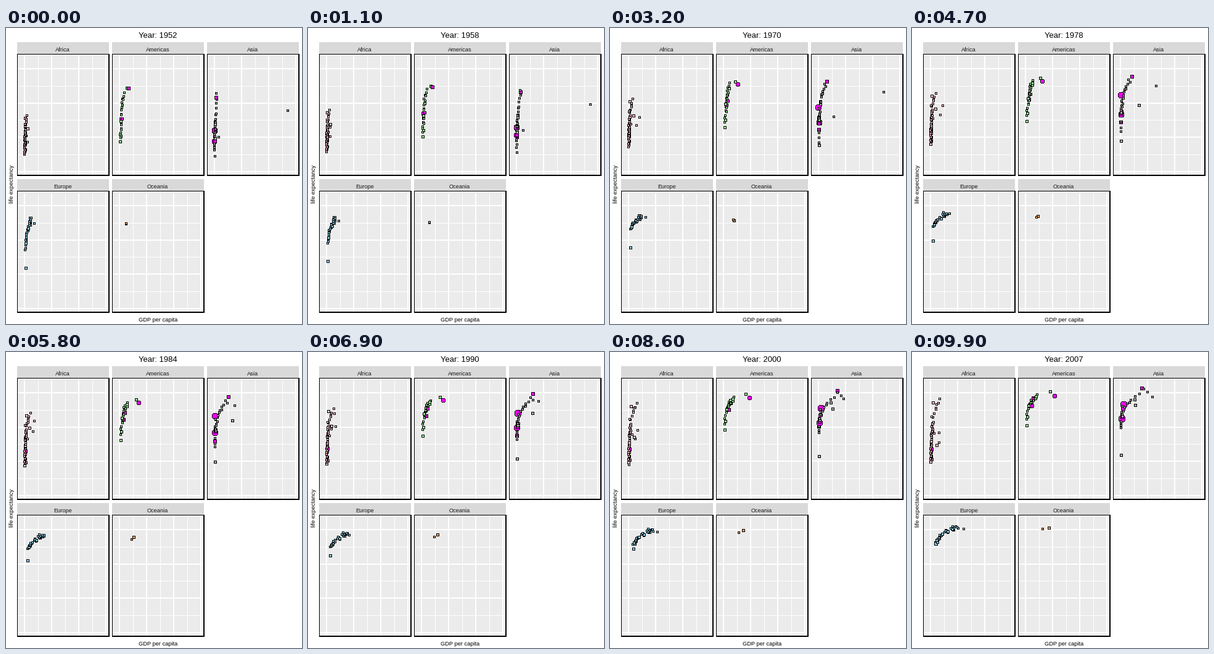
These frames come from a looping animation (480x480 px, 10 s). A matplotlib script:

```python
import numpy as np
import matplotlib.pyplot as plt
from matplotlib.animation import FuncAnimation
from matplotlib.patches import Rectangle

plt.rcParams["font.family"] = "Liberation Sans"

SIZE, FRAMES = 480, 100
FIRST, LAST = 1952, 2007
QUARTILES = np.linspace(0, 1, 5)
rng = np.random.default_rng(7)

fig = plt.figure(figsize=(SIZE / 72, SIZE / 72), dpi=72, facecolor="white")
ax = fig.add_axes([0, 0, 1, 1])
ax.set(xlim=(0, SIZE), ylim=(SIZE, 0))
ax.axis("off")


def box(x, y, w, h, color):
    ax.add_patch(Rectangle((x, y), w, h, fc=color, lw=0, antialiased=False))


def label(x, y, text, size, **kw):
    return ax.text(x, y, text, fontsize=size, ha="center", va="baseline", **kw)


def draw_panel(title, x, y):
    box(x, y, 149, 20, "#d9d9d9")
    label(x + 74, y + 15, title, 9.3, color="#1a1a1a")
    top = y + 19
    box(x, top, 150, 198, "black")
    box(x + 1, top + 1, 147, 195, "#ebebeb")
    for k in range(7):
        major = k % 2 == 0
        box(x + 1, top + 24 + round(27.8 * k) - major, 147, 1 + major, "white")
        box(x + 12 + 22 * k - major, top + 1, 1 + major, 195, "white")


def at(keys, year):
    """Value at a year, with keys spread evenly over the whole period."""
    return np.interp(year, np.linspace(FIRST, LAST, len(keys)), keys)


def cloud(n, life, gdp, noise):
    """n countries ranked poor to rich.

    life: quartiles per key year; gdp: low, middle, high per key year.
    """
    rank = (np.arange(n) + rng.random(n)) / n
    rank[0], rank[-1] = 0, 1
    countries = []
    for r in rank:
        luck = np.exp(noise * rng.normal())
        lives = [np.interp(r, QUARTILES, q) for q in life]
        gdps = [luck * np.exp(np.interp(r, QUARTILES[::2], np.log(g)))
                for g in gdp]
        people = min(np.exp(rng.normal(2.1, 0.9)), 85)
        countries.append((lives, gdps, (people / 2, people)))
    return countries


# Clouds of ordinary countries, then the few that stand out:
# (life expectancy keys, GDP keys, population keys in millions)
AFRICA = cloud(
    46,
    [(30, 35.2, 39, 42, 52.5), (34.5, 41.2, 45, 50, 62.5),
     (38.5, 46.5, 51, 57.5, 70), (39.6, 46, 52.5, 59, 76.4)],
    [(500, 950, 2200), (650, 1150, 4800), (650, 1400, 8000)], 0.4)
AFRICA_STARS = [
    ((36.3, 42.2, 47.1, 46.9), (1077, 2014), (33, 135)),
    ((42.7, 51.9, 67.1, 74), (2387, 9000, 21400, 14000, 9500, 12057), (1, 6)),
    ((37, 47.3, 60.5, 56.7), (4293, 7000, 15500, 13200, 14500, 13206), (1, 2)),
    ((47.6, 52, 57.5, 63.2, 54, 50.7), (851, 1900, 6700, 12570), (1, 2)),
    ((45, 53, 61.5, 49.3), (4725, 7500, 7700, 9270), (14, 44)),
    ((40, 43.3, 44.8, 45, 33.6, 46.2), (493, 863), (3, 9)),
]
AMERICAS = cloud(
    21,
    [(37.6, 43.5, 50.8, 58.8, 66.1), (46.1, 54.1, 61.1, 66.3, 71.8),
     (54.1, 64.2, 67.9, 72, 75.1), (60.9, 70.5, 72.7, 75.2, 78.8)],
    [(1900, 3000, 5500), (2400, 6200, 8500), (2000, 7000, 13500)], 0.28)
AMERICAS_STARS = [
    ((50.9, 58.9, 65.8, 72.4), (2109, 4460, 7500, 9066), (57, 190)),
    ((68.8, 72.6, 77.2, 80.7), (11367, 18000, 26550, 36319), (14, 33)),
    ((50.8, 61.6, 70.1, 76.2), (3478, 6450, 8950, 11978), (30, 109)),
    ((68.4, 71.1, 75.4, 78.2), (13990, 20900, 30600, 42952), (158, 301)),
]
ASIA = cloud(
    24,
    [(32.5, 39.4, 44.9, 50.8, 65.4), (37, 50.5, 55.5, 64, 71.3),
     (52, 60.3, 66, 70.2, 76.7), (59.5, 66.5, 71.5, 74.4, 82.2)],
    [(500, 1150, 3500), (650, 2900, 13000), (1000, 5200, 36000)], 0.3)
ASIA_STARS = [
    ((28.8, 35.4, 41.1, 43.8), (779, 975), (8, 32)),
    ((37.5, 44.6, 54, 64.1), (684, 1391), (47, 150)),
    ((44, 47.3, 63.5, 66.4, 70, 73), (400, 640, 1450, 4959), (556, 820, 1110, 1319)),
    ((37.4, 49, 59.1, 64.7), (547, 720, 1040, 2452), (372, 1110)),
    ((37.5, 48.1, 61, 70.7), (750, 980, 1960, 3541), (82, 223)),
    ((63, 72.7, 78.9, 82.6), (3217, 13100, 23900, 31656), (86, 127)),
    ((55.6, 66.6, 74.5, 77.6),
     (108382, 113523, 95458, 80895, 109348, 59265,
      31354, 28118, 34933, 40301, 35110, 47307), (1, 3)),
    ((43.4, 51.3, 59.1, 65.5), (685, 2606), (41, 169)),
    ((39.9, 52.2, 67.6, 72.8), (6460, 12600, 28600, 26200, 20900, 21655), (4, 27)),
]
EUROPE = cloud(
    27,
    [(54, 61, 65.9, 68.5, 72.7), (66.6, 69.5, 70.6, 72, 74.4),
     (69.5, 71.3, 74.3, 75.8, 77.8), (72.5, 75, 78.6, 79.8, 81.8)],
    [(1500, 5000, 9000), (4500, 14000, 22500), (7500, 23000, 36500)], 0.13)
EUROPE_STARS = [
    ((72.7, 74.2, 76.4, 80.2), (10095, 18000, 32400, 49357), (3, 5)),
    ((69.6, 73.4, 77.6, 81.7), (14734, 25900, 30900, 37506), (5, 8)),
    ((43.6, 55.8, 64.1, 71.8), (1969, 3200, 5300, 8458), (22, 71)),
]
OCEANIA_STARS = [
    ((69.1, 71.5, 76.8, 81.2), (10040, 16100, 22400, 34435), (9, 20)),
    ((69.4, 71.7, 75, 80.2), (10557, 15300, 18800, 25185), (2, 4)),
]

PANELS = [
    ("Africa", 18, 23, "pink", AFRICA, AFRICA_STARS),
    ("Americas", 172, 23, "lightgreen", AMERICAS, AMERICAS_STARS),
    ("Asia", 326, 23, "darkgray", ASIA, ASIA_STARS),
    ("Europe", 18, 245, "skyblue", EUROPE, EUROPE_STARS),
    ("Oceania", 172, 245, "sandybrown", [], OCEANIA_STARS),
]

# Each dot is a black disc with a smaller coloured disc on top.
dots, colors = [], []
for title, left, top, fill, crowd, stars in PANELS:
    draw_panel(title, left, top)
    for country in crowd[::2] + stars + crowd[1::2]:
        dots.append((left + 12.3, top + 43.4, *country))
        colors += ["black", "magenta" if country[2][-1] > 100 else fill]

label(247, 476, "GDP per capita", 9.3)
ax.text(14, 253, "life expectancy", fontsize=9.4, rotation=90,
        ha="right", va="center")
heading = label(246.5, 16, "", 13)
discs = ax.scatter(np.zeros(len(colors)), np.zeros(len(colors)), c=colors,
                   linewidths=0, antialiaseds=False, zorder=3)


def snap(v, width):
    """Centre that puts a disc of whole width on whole pixels."""
    return np.floor(v) + width % 2 / 2


def update(i):
    year = FIRST + (LAST - FIRST) * i / (FRAMES - 1)
    spots, areas = [], []
    for x0, y80, life, gdp, people in dots:
        d = round(3.8 + 7.4 * np.sqrt(at(people, year) / 1319))
        spot = (snap(x0 + 0.0011 * at(gdp, year), d),
                snap(y80 + 2.78 * (80 - at(life, year)), d))
        spots += [spot, spot]
        areas += [d ** 2, (d - 2) ** 2]
    discs.set_offsets(spots)
    discs.set_sizes(areas)
    heading.set_text(f"Year: {round(year)}")
    return discs, heading


anim = FuncAnimation(fig, update, frames=FRAMES, interval=100, repeat=True)
plt.show()
```
